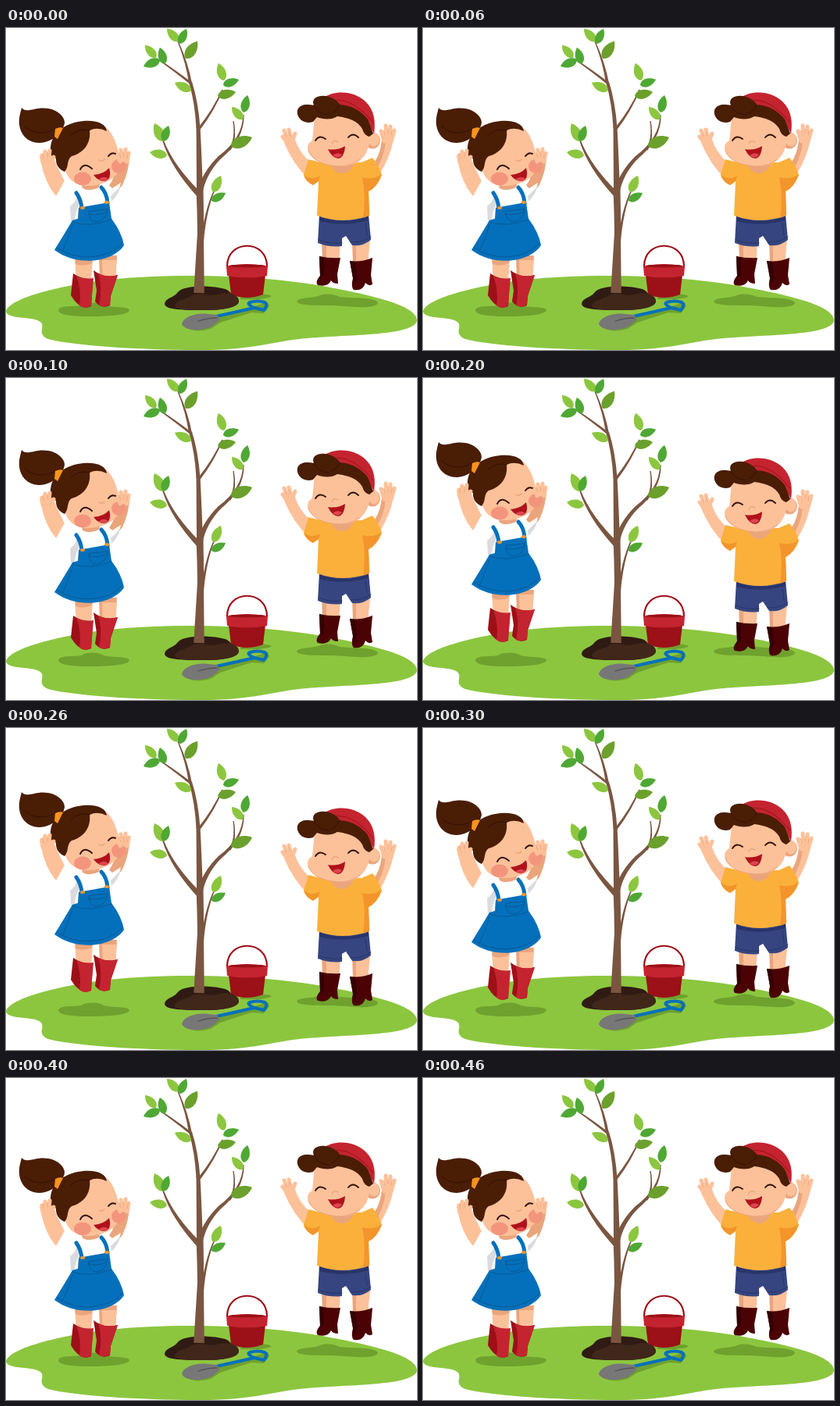
An HTML page with a canvas for the animation above (500 ms loop, 526 by 412 pixels).

```html
<!DOCTYPE html>
<html lang="en">
<head>
<meta charset="utf-8">
<title>Planting a tree</title>
<style>
html, body { margin: 0; width: 100%; height: 100%; overflow: hidden; background: #fff; }
canvas { display: block; }
</style>
</head>
<body>
<canvas id="stage" width="526" height="412"></canvas>
<script>
const ctx = document.getElementById('stage').getContext('2d');
const STEP = 100, STEPS = 5, RISE = 10;

const SKIN = '#fdc19a', SKIN_DARK = '#eaa57c', HAIR = '#4a1d05', HAIR_DARK = '#321203';
const GRASS = '#8cc63f', GRASS_DARK = '#6fa12e', LEAF = '#4fa834', OLIVE = '#6ca02c', BARK = '#7a5641';
const RED = '#c4242f', RED_DARK = '#9c1018', BLUE = '#0470bb', BLUE_DARK = '#075a96';
const NAVY = '#36457f', NAVY_DARK = '#28346a', ORANGE = '#fbb03b', ORANGE_DARK = '#f3952a';
const BOOT = '#4b0204', BOOT_DARK = '#330203', MOUTH = '#b0121c', TONGUE = '#dd4650', INK = '#32150a';

function fill(color, d) {
  ctx.fillStyle = color;
  ctx.fill(new Path2D(d));
}

function line(color, width, d) {
  ctx.strokeStyle = color;
  ctx.lineWidth = width;
  ctx.stroke(new Path2D(d));
}

function oval(color, x, y, rx, ry = rx, turn = 0) {
  ctx.fillStyle = color;
  ctx.beginPath();
  ctx.ellipse(x, y, rx, ry, turn, 0, Math.PI * 2);
  ctx.fill();
}

// Tapered quadratic stroke.
function limb(x0, y0, cx, cy, x1, y1, w0, w1) {
  const side = (ax, ay, bx, by, w) => {
    const len = Math.hypot(bx - ax, by - ay);
    return [(ay - by) / len * w / 2, (bx - ax) / len * w / 2];
  };
  const [ax, ay] = side(x0, y0, cx, cy, w0);
  const [mx, my] = side(x0, y0, x1, y1, (w0 + w1) / 2);
  const [bx, by] = side(cx, cy, x1, y1, w1);
  ctx.fillStyle = BARK;
  ctx.beginPath();
  ctx.moveTo(x0 + ax, y0 + ay);
  ctx.quadraticCurveTo(cx + mx, cy + my, x1 + bx, y1 + by);
  ctx.lineTo(x1 - bx, y1 - by);
  ctx.quadraticCurveTo(cx - mx, cy - my, x0 - ax, y0 - ay);
  ctx.fill();
}

// Pointed at the tip, rounder toward the stalk.
function leaf(color, tipX, tipY, x, y, fat = 0.33) {
  const dx = tipX - x, dy = tipY - y;
  const at = (along, across) => [x + dx * along - dy * across, y + dy * along + dx * across];
  ctx.fillStyle = color;
  ctx.beginPath();
  ctx.moveTo(x, y);
  ctx.bezierCurveTo(...at(0.15, fat), ...at(0.65, fat), tipX, tipY);
  ctx.bezierCurveTo(...at(0.65, -fat), ...at(0.15, -fat), x, y);
  ctx.fill();
}

function drawGround() {
  fill(GRASS, 'M0 363C3 347 60 331 130 322C220 313 330 316 410 331C475 343 526 356 526 374C524 394 440 392 385 397C340 401 318 412 250 412C165 412 85 406 54 398C39 391 50 384 45 377C37 368 3 374 0 363Z');
  fill(GRASS_DARK, 'M67 361C69 354 87 357 96 355C104 350 120 351 125 355C138 358 157 356 158 361C157 367 134 369 106 369C84 369 67 367 67 361Z');
  fill(GRASS_DARK, 'M372 350C374 344 395 346 402 342C412 339 420 341 427 344C442 346 475 344 476 352C474 358 451 358 436 356C411 354 375 357 372 350Z');
}

function drawBucket() {
  fill(GRASS_DARK, 'M300 345Q330 337 340 343Q336 348 300 347Z');
  line(RED_DARK, 2.2, 'M283 305C283 270 334 270 334 305');
  fill(RED_DARK, 'M285 316H332L329 341Q308 349 288 341Z');
  fill(RED, 'M282 305Q308 299 335 305L334 317Q308 322 283 317Z');
  oval(RED_DARK, 308.5, 304.5, 24, 2);
}

function drawTree() {
  fill('#2f1b13', 'M203 353C204 345 215 345 219 339C225 329 260 329 276 333C290 335 287 344 296 346C304 355 283 361 255 361C228 361 204 361 203 353Z');
  limb(247, 339, 248, 300, 249, 262, 13.5, 8);
  limb(249, 264, 249, 235, 248, 205, 8, 9);
  limb(248, 207, 247, 160, 246, 126, 8, 5);
  limb(246, 128, 244, 95, 236, 69, 5, 4);
  limb(236, 71, 232, 45, 220, 17, 4, 1.3);
  limb(247, 213, 213, 178, 201, 144, 7, 1.8);
  limb(248, 211, 253, 186, 274, 165, 7, 4.5);
  limb(273, 166, 304, 142, 304, 111, 4.5, 1.3);
  limb(286, 156, 295, 143, 291, 119, 3, 1.3);
  limb(247, 129, 266, 105, 277, 79, 3.6, 1.6);
  limb(237, 71, 214, 53, 193, 39, 3.4, 1.5);
  limb(251, 275, 255, 233, 267, 207, 3.6, 1.5);
  fill('#40271a', 'M216 355C219 347 232 347 238 342C249 337 261 344 270 341C286 336 299 342 298 350C297 358 278 361 255 361C235 361 216 361 216 355Z');

  leaf(GRASS, 206, 1, 221, 17);
  leaf(LEAF, 231, 1, 222, 20);
  leaf(OLIVE, 245, 17, 230, 39);
  leaf(GRASS, 178, 22, 192, 38);
  leaf(LEAF, 197, 25, 203, 46);
  leaf(LEAF, 176, 49, 197, 41);
  leaf(GRASS, 216, 70, 237, 80);
  leaf(GRASS, 272, 45, 279, 67);
  leaf(LEAF, 298, 66, 278, 73);
  leaf(OLIVE, 294, 82, 271, 87);
  leaf(GRASS, 289, 101, 303, 117);
  leaf(LEAF, 309, 86, 304, 108);
  leaf(OLIVE, 315, 140, 288, 151);
  leaf(GRASS, 190, 122, 201, 145);
  leaf(LEAF, 208, 125, 201, 145);
  leaf(GRASS, 184, 159, 206, 163);
  leaf(GRASS, 275, 189, 265, 210);
  leaf(LEAF, 281, 211, 263, 221);
}

function drawShovel() {
  fill(GRASS_DARK, 'M229 382Q240 391 262 385L274 377L314 364L330 365L337 356L335 351L270 370Z');
  line(BLUE, 4, 'M269 369L318 358');
  line(BLUE, 4, 'M318 358Q307 353 312 351Q322 348 331 351Q336 354 330 361Z');
  fill('#777', 'M225 379C227 369 244 364 259 366L270 367L274 373L266 380C255 388 230 389 225 379Z');
  line('#555', 1.3, 'M246 375Q258 371 270 371');
}

function drawGirl() {
  // Legs and boots
  fill(SKIN_DARK, 'M119 291H142L140 322H120Z');
  fill(SKIN, 'M88 294H111L109 326H90Z');
  fill(SKIN_DARK, 'M88 294H111L110 301Q98 306 89 302Z');
  fill(SKIN, 'M123 297H142L139 322H124Z');
  fill(RED_DARK, 'M112 310Q126 321 143 316L134 343L133 355Q122 360 114 350L116 336Z');
  fill(RED, 'M118 314Q130 320 143 316L134 342L133 354Q126 358 119 355Q124 332 118 314Z');
  fill(RED_DARK, 'M86 314Q97 322 111 321L109 356Q98 362 87 348L83 342Z');
  fill(RED, 'M90 317Q99 322 112 320L109 355Q101 361 94 355Q97 336 90 317Z');

  // Ponytail
  fill(HAIR, 'M20 102C26 110 38 100 54 103C67 105 75 114 75 121C74 132 59 147 43 147C24 147 13 130 18 110Z');
  line(HAIR_DARK, 1, 'M24 126Q41 141 65 128');

  // Arms
  fill(SKIN, 'M43 165Q46 158 58 158L65 176L77 200L68 219Q55 207 48 185Z');
  fill(SKIN_DARK, 'M143 168L158 163Q158 181 149 201L136 216L131 203Q141 190 143 168Z');

  // Shirt and dress
  fill('#fff', 'M63 217L78 190L93 199L127 197L136 205L147 198Q145 211 134 217L134 236L84 246L82 233Q70 228 63 217Z');
  fill('#d9dbdf', 'M82 228Q92 222 91 207Q97 222 90 234L87 248L83 246ZM134 215L146 203Q145 212 135 222Z');
  fill(SKIN_DARK, 'M96 197L122 194L119 204Q107 210 98 205Z');
  fill(BLUE, 'M85 246L92 244L93 230L132 223L135 244Q148 261 151 278C137 300 91 306 62 284Q75 263 85 246Z');
  line(BLUE_DARK, 1, 'M85 248Q106 256 135 245M65 281C91 299 131 296 149 275');
  line(BLUE_DARK, 1, 'M85 252Q80 270 72 286M106 235Q106 248 116 248Q129 246 130 232ZM105 238Q118 241 130 235');
  line(BLUE, 5, 'M90 211Q96 219 97 231M122 204Q129 211 130 224');
  oval(ORANGE_DARK, 98, 230, 3, 2);
  oval(ORANGE_DARK, 129, 223, 3, 2);

  // Head
  fill(SKIN, 'M75 170L107 127L128 127C138 136 141 148 145 162C151 171 151 180 144 184C136 196 119 203 102 202C87 201 78 192 75 180Z');
  fill(HAIR, 'M58 163C53 142 67 125 92 120C114 116 128 122 129 132Q117 126 107 131C109 148 99 160 84 164C77 169 81 177 75 184C64 179 64 171 64 167Z');
  line(HAIR_DARK, 1, 'M107 131Q95 127 83 137');
  fill('#f7941d', 'M63 129Q69 126 73 128L66 142L62 139Z');
  oval('#f3957d', 98, 193, 11, 8.5);
  oval('#f3957d', 144, 177, 9, 9);
  line(INK, 1.9, 'M95 181Q100 171 110 180M131 164Q136 157 144 163');
  line(SKIN_DARK, 1.5, 'M119 169Q123 172 126 168');
  fill(MOUTH, 'M112 188Q125 187 132 179Q136 194 126 196Q118 196 112 188Z');
  fill(TONGUE, 'M118 194Q125 188 131 193Q127 198 118 194Z');

  // Fingers
  line(SKIN, 5, 'M47 172L46 163M50 169L50 158M55 168L56 157M57 173L61 165');
  line(SKIN, 5, 'M146 171L143 162M149 169L147 156M152 169L153 155M155 171L157 160');
  line(SKIN_DARK, 0.9, 'M48 167L47 161M53 165L53 160M147 166L145 160M151 165L150 159M155 167L155 161');
}

function drawBoy() {
  // Legs and boots
  fill(SKIN_DARK, 'M404 273H428L426 297H405Z');
  fill(SKIN, 'M410 273H428L425 297H410Z');
  fill(SKIN_DARK, 'M443 272H465L463 300H444Z');
  fill(SKIN, 'M448 272H466L463 300H448Z');
  fill(BOOT, 'M401 292Q414 295 428 294L424 315L425 327Q418 327 416 323Q412 332 399 329Q395 325 402 317Z');
  fill(BOOT_DARK, 'M401 292L407 294L407 316L399 322L402 317Z');
  fill(BOOT, 'M440 298Q454 300 469 294L467 316L469 328Q464 331 460 326Q457 337 445 335Q441 331 444 320Z');
  fill(BOOT_DARK, 'M440 298L447 299L449 320L445 330L444 320Z');

  // Arms
  fill(SKIN, 'M356 147L369 140Q375 160 391 173L386 192Q368 175 356 147Z');
  fill(SKIN, 'M481 143L496 142Q492 165 477 189L465 180Q479 166 481 143Z');
  fill(SKIN_DARK, 'M481 143L486 144Q484 168 471 185L465 180Q479 166 481 143Z');

  // Clothes
  fill(NAVY, 'M401 239H464L467 271Q456 280 443 278L435 266L430 269L430 279Q414 281 399 275Z');
  fill(NAVY_DARK, 'M401 241Q432 253 464 241V246Q431 255 401 247Z');
  line(NAVY_DARK, 1, 'M400 271Q414 277 430 275M441 274Q456 275 467 267M460 250L462 265');
  fill(ORANGE, 'M387 168L403 172H455L469 166Q477 175 481 188Q475 204 464 209L465 240Q431 252 398 240L400 196L393 201Q383 196 381 188Z');
  fill(ORANGE_DARK, 'M381 188Q392 196 402 189L400 196L393 201Q384 197 381 188ZM456 191Q470 195 481 187Q475 204 464 209L465 240L457 243Q461 216 456 191Z');
  fill(SKIN_DARK, 'M414 172H446Q441 186 429 186Q419 185 414 172Z');

  // Head
  oval(SKIN_DARK, 469, 144, 10, 10.5);
  oval(SKIN, 471, 143, 7, 8.5);
  fill(SKIN, 'M395 113Q425 96 458 113L466 137C466 161 453 178 427 177C409 177 386 168 386 153Q386 147 392 144Z');
  line(SKIN_DARK, 1, 'M387 157Q394 175 426 177Q442 177 453 168');
  fill(RED, 'M405 90C421 78 447 81 460 94C472 106 473 120 471 135Q462 116 443 104Z');
  line(RED_DARK, 1, 'M424 92Q447 92 470 121');
  fill(HAIR, 'M393 120C380 124 371 114 373 105C377 96 387 98 394 99C389 88 405 84 416 89Q424 92 427 98C444 99 455 107 463 117L470 135L465 139Q458 137 456 129C450 119 439 115 424 113C417 118 405 117 398 114Z');
  line(HAIR_DARK, 1, 'M394 99Q399 110 413 111M427 98Q424 106 417 109');
  line(INK, 1.9, 'M396 144Q401 136 409 142M438 140Q444 133 451 140');
  line(SKIN_DARK, 1.5, 'M417 148Q420 142 425 146');
  fill(MOUTH, 'M412 155Q424 157 434 151Q433 166 425 167Q417 166 412 155Z');
  fill(TONGUE, 'M418 163Q424 158 430 162Q425 169 418 163Z');

  // Hands
  line(SKIN, 5, 'M359 146L354 139M361 143L356 131M365 142L362 130M366 145L370 135');
  line(SKIN, 5, 'M484 145L480 132M487 143L486 125M491 143L492 126M493 145L497 131');
  line(SKIN_DARK, 0.9, 'M359 139L357 135M364 138L362 133M485 137L483 131M489 135L489 129M493 137L494 132');
}

function shifted(dy, draw) {
  ctx.save();
  ctx.translate(0, dy);
  draw();
  ctx.restore();
}

function render(now) {
  const step = Math.floor(now / STEP) % STEPS;
  const hop = RISE * (2 - Math.abs(2 - step));
  ctx.fillStyle = '#fff';
  ctx.fillRect(0, 0, 526, 412);
  ctx.lineCap = ctx.lineJoin = 'round';
  drawGround();
  drawBucket();
  drawTree();
  drawShovel();
  shifted(-hop, drawGirl);
  shifted(hop, drawBoy);
}

let start;
function tick(now) {
  start ??= now;
  render(now - start);
  requestAnimationFrame(tick);
}
render(0);
requestAnimationFrame(tick);
</script>
</body>
</html>
```
